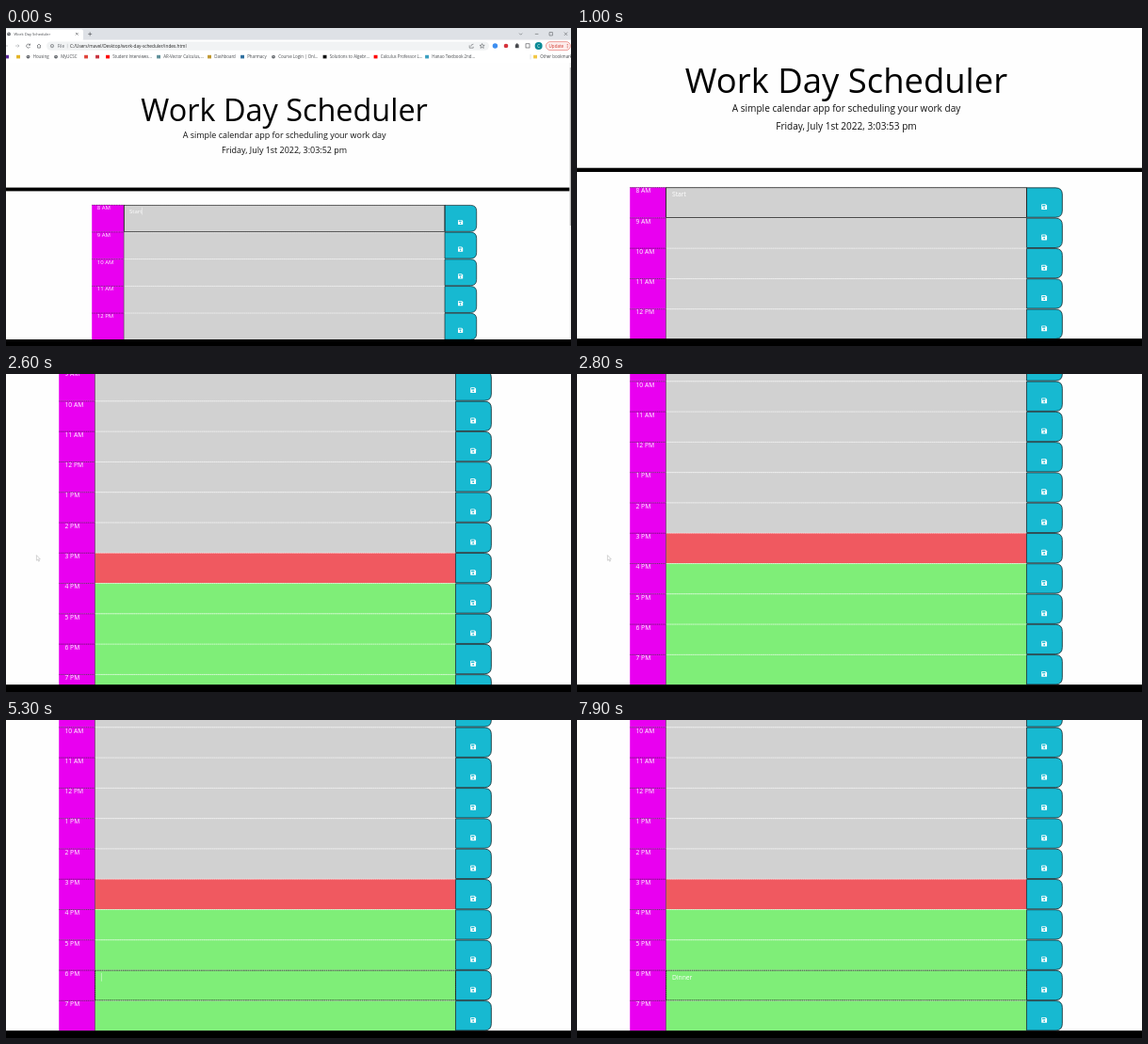
An HTML page that plays this animation: 600x338 px, repeating every 8000 ms.

```html
<!DOCTYPE html>
<html lang="en">
<head>
<meta charset="utf-8">
<title>Work Day Scheduler</title>
<style>
  html, body { margin: 0; width: 100%; height: 100%; overflow: hidden; background: #fefefe; }
  svg { display: block; width: 100vw; height: 100vh; font-family: "Open Sans", "Noto Sans", sans-serif; }
</style>
</head>
<body>
<svg id="stage" viewBox="0 0 600 338"></svg>
<script>
const LOOP = 8000;
const ROW_TOP = 188, ROW_H = 28.72, HOUR_X = 91.2, AREA_X = 125.4, BTN_X = 466, END_X = 500;
const ZOOM = 1.124, ZOOM_X = -46.3, ZOOM_Y = 338 * (1 - ZOOM);
const SCROLL_MAX = 201.4;
const PAST = '#d1d1d1', PRESENT = '#f05960', FUTURE = '#7fee78';

function el(parent, tag, attrs, content) {
  const node = document.createElementNS('http://www.w3.org/2000/svg', tag);
  for (const key in attrs) node.setAttribute(key, attrs[key]);
  if (content !== undefined) node.textContent = content;
  parent.appendChild(node);
  return node;
}
const rect = (p, x, y, width, height, fill, more) => el(p, 'rect', { x, y, width, height, fill, ...more });
const path = (p, d, stroke, width = 0.6, more) =>
  el(p, 'path', { d, stroke, 'stroke-width': width, fill: 'none', ...more });
const text = (p, x, y, size, fill, content, more) =>
  el(p, 'text', { x, y, 'font-size': size, fill, ...more }, content);
const dot = (p, cx, cy, r, fill, more) => el(p, 'circle', { cx, cy, r, fill, ...more });
const show = (node, on) => node.setAttribute('visibility', on ? 'visible' : 'hidden');

const stage = document.getElementById('stage');
rect(stage, 0, 0, 600, 338, '#fefefe');
const view = el(stage, 'g', {});
const page = el(view, 'g', {});

// Header
const middle = { 'text-anchor': 'middle' };
text(page, 295.6, 98.6, 32.4, '#000', 'Work Day Scheduler', middle);
text(page, 295.7, 116.9, 8.96, '#111', 'A simple calendar app for scheduling your work day', middle);
const clock = text(page, 295.6, 133.2, 8.96, '#111', '', middle);
rect(page, -5, 169.6, 604, 3.8, '#000');

// Hour rows
function saveIcon(x, y) {
  const g = el(page, 'g', { transform: `translate(${x} ${y})` });
  el(g, 'path', { d: 'M-2.6-2.1Q-2.6-2.6-2.1-2.6H1.4L2.6-1.4V2.1Q2.6 2.6 2.1 2.6H-2.1Q-2.6 2.6-2.6 2.1Z', fill: '#fff' });
  rect(g, -1.8, -1.9, 2.9, 1.3, '#17b9d1');
  dot(g, 0, 1, 0.8, '#17b9d1');
}

function hourRow(index) {
  const y = ROW_TOP + index * ROW_H, hour = 8 + index, bottom = y + ROW_H;
  const fill = hour < 15 ? PAST : hour === 15 ? PRESENT : FUTURE;
  rect(page, HOUR_X, y, AREA_X - HOUR_X, ROW_H + 0.1, '#e900f0');
  rect(page, AREA_X, y, BTN_X - AREA_X, ROW_H + 0.1, fill);
  path(page, `M${HOUR_X} ${y + 0.2}H${AREA_X}`, '#222', 0.5, { 'stroke-dasharray': '1.1 .5' });
  path(page, `M${AREA_X} ${y + 0.2}H${BTN_X}`, '#fff', 0.8, { opacity: 0.65, 'stroke-dasharray': '1.6 .3' });
  path(page, `M${AREA_X - 0.2} ${y}V${bottom}`, '#333', 0.5);
  text(page, 96.8, y + 5.3, 6, '#fff', `${(hour + 11) % 12 + 1} ${hour < 12 ? 'AM' : 'PM'}`);
  el(page, 'path', {
    d: `M${BTN_X} ${y + 0.4}H${END_X - 6.7}q6.4 0 6.4 6.4V${bottom - 6.8}q0 6.4-6.4 6.4H${BTN_X}Z`,
    fill: '#17b9d1', stroke: '#14262b', 'stroke-width': 0.7
  });
  saveIcon(482.6, y + 18.5);
}
for (let i = 0; i < 12; i++) hourRow(i);

function field(index, dash) {
  const y = ROW_TOP + index * ROW_H;
  const outline = rect(page, AREA_X, y + 0.3, BTN_X - AREA_X, ROW_H - 0.5, 'none',
    { stroke: '#222', 'stroke-width': 0.7, 'stroke-dasharray': dash });
  const label = text(page, 131, y + 8.8, 6, '#fff', '');
  const caret = rect(page, 131, y + 2.6, 0.5, 8, '#fff', { opacity: 0.8 });
  return (value, focused, caretOn) => {
    if (label.textContent !== value) {
      label.textContent = value;
      caret.setAttribute('x', 131 + (value ? label.getComputedTextLength() : 0));
    }
    show(outline, focused);
    show(caret, focused && caretOn);
  };
}
const morning = field(0, 'none'), evening = field(10, '1.6 .4');

// Browser window
const chrome = el(view, 'g', {});
const INK = '#45484c';
function globe(x, y) {
  dot(chrome, x, y, 1.9, '#5f6368');
  path(chrome, `M${x - 1.3} ${y - 0.5}h1.5l.8 1`, '#fff', 0.5);
}
rect(chrome, -5, -5, 660, 18, '#dee1e6');
rect(chrome, -5, 1.6, 87, 12, '#fff', { rx: 2 });
rect(chrome, -5, 12.6, 660, 24.4, '#fff');
globe(3, 6.4);
text(chrome, 8.6, 8, 4.1, INK, 'Work Day Scheduler');
path(chrome, 'M74 5l2.6 2.6m0-2.6L74 7.6M87.2 6.4h4m-2-2v4', INK);
path(chrome, 'M545 5.6l1.6 1.6 1.6-1.6M561.8 6.4h3.6M577 4.6h3.4v3.4h-3.4zM592.8 4.6l3.4 3.4m0-3.4l-3.4 3.4', INK, 0.5);

rect(chrome, 43, 14.4, 470, 9.4, '#f1f3f4', { rx: 4.7 });
path(chrome, 'M-2 19h4M10 19h4m-1.6-1.6l1.6 1.6-1.6 1.6', '#a5a8ac');
path(chrome, 'M25.2 17.8a2 2 0 1 0 .3 2.2M25.6 16.6v1.6h-1.6M33 19l2-1.9 2 1.9M33.6 18.7v2.4h2.8v-2.4', INK);
dot(chrome, 49, 19.1, 1.7, 'none', { stroke: INK, 'stroke-width': 0.5 });
path(chrome, 'M49 18.9v1.2M49 18v.4', INK, 0.5);
text(chrome, 54.8, 20.8, 4.5, '#5f6368', 'File');
path(chrome, 'M65.3 16.8v4.6', '#b5b8bc', 0.5);
text(chrome, 68, 20.8, 4.74, '#222', 'C:/Users/mavel/Desktop/work-day-scheduler/index.html');
path(chrome, 'M492.2 18.4v2.8h4v-1.4M493.8 19.6q0-2.4 2.6-2.4', INK, 0.5);
el(chrome, 'path', { d: 'M505.6 16.6l.7 1.7 1.9.1-1.5 1.2.5 1.8-1.6-1-1.6 1 .5-1.8-1.5-1.2 1.9-.1z', fill: 'none', stroke: INK, 'stroke-width': 0.5 });
dot(chrome, 519.4, 19, 2.7, '#3d8ef0');
dot(chrome, 531, 19, 2.3, '#d6343c');
rect(chrome, 540.8, 17.4, 3.8, 3.8, INK);
dot(chrome, 542.7, 17.2, 0.9, INK);
rect(chrome, 552, 16.8, 4, 4.2, 'none', { stroke: INK, 'stroke-width': 0.6 });
dot(chrome, 565.6, 19.1, 4, '#0b8a96');
text(chrome, 565.6, 20.8, 4.4, '#fff', 'C', middle);
rect(chrome, 573.4, 14.6, 26, 9, '#fdeceb', { rx: 4.5, stroke: '#dd4b40', 'stroke-width': 0.5 });
text(chrome, 576.6, 20.7, 4.5, '#d23b30', 'Update');
for (const y of [17.4, 19.1, 20.8]) dot(chrome, 596.2, y, 0.5, '#d23b30');

// Bookmarks: icon x, label, icon colour (a globe when missing)
const bookmarks = [
  [1, '', '#5b2a9d'], [13, '', '#e4b324'], [23.5, 'Housing'], [53, 'MyUCSC'],
  [85, '', '#e0443a'], [97, '', '#c9333f'], [108, 'Student Interviews...', '#f00'],
  [162, 'AR-Vector Calculus,...', '#5e8f99'], [216, 'Dashboard', '#c0972f'],
  [251, 'Pharmacy', '#2f6f9f'], [284, 'Course Login | Onl...'],
  [338.5, 'Solutions to Algebr...', '#111'], [392.5, 'Calculus Professor L...', '#f00'],
  [447, 'Hanao Textbook 2nd...', '#3a9fc0'], [562, 'Other bookmarks', '#f2c744']
];
for (const [x, label, color] of bookmarks) {
  if (color) rect(chrome, x - 1.9, 28.8, 3.9, 3.6, color);
  else globe(x, 30.6);
  text(chrome, x + 5.2, 32, 4.4, INK, label);
}
path(chrome, 'M557 28v5.4', '#c5c8cc', 0.5);

rect(chrome, 598.4, 37, 5, 295, '#f1f1f1');
const thumb = rect(chrome, 598.8, 42, 4, 168, '#b9b9b9');
rect(view, -10, 331, 680, 20, '#000');

const pointer = el(stage, 'path', {
  d: 'M0 0V5.6L1.3 4.5L2.2 6.6L3.1 6.2L2.2 4.2H3.9Z',
  fill: '#fff', stroke: '#a8a8a8', 'stroke-width': 0.5
});

// Motion
const progress = (t, from, to) => Math.min(1, Math.max(0, (t - from) / (to - from)));
const smooth = u => u * u * (3 - 2 * u);
const cubic = u => u < 0.5 ? 4 * u ** 3 : 1 - 4 * (1 - u) ** 3;
const mix = (a, b, u) => a + (b - a) * u;
const keyTimes = [5900, 6200, 6400, 6600, 6800, 7000];
const FOCUS = 4000, BLUR = 1600;

function draw(t) {
  const zoom = smooth(progress(t, 0, 900));
  view.setAttribute('transform',
    `translate(${ZOOM_X * zoom} ${ZOOM_Y * zoom}) scale(${mix(1, ZOOM, zoom)})`);

  const scroll = cubic(progress(t, 2103, 2800));
  page.setAttribute('transform', `translate(0 ${-SCROLL_MAX * scroll})`);
  thumb.setAttribute('y', 42 + 118 * scroll);

  const second = Math.min(59, 52 + Math.floor((t + 300) / 1000));
  clock.textContent = `Friday, July 1st 2022, 3:03:${second} pm`;

  const typed = keyTimes.filter(k => t >= k).length;
  const blinkStart = typed ? keyTimes[typed - 1] : FOCUS;
  morning('Start', t < BLUR, t < 500);
  evening('Dinner'.slice(0, typed), t >= FOCUS, (t - blinkStart) % 1000 < 500);

  const arrive = smooth(progress(t, 1050, 1550)), leave = smooth(progress(t, 3100, 3900));
  const x = mix(mix(190, 32.4, arrive), 170, leave);
  const y = mix(mix(185, 192.6, arrive), 281, leave);
  pointer.setAttribute('transform', `translate(${x} ${y})`);
  show(pointer, x < 94);
}

function frame(now) {
  draw(now % LOOP);
  requestAnimationFrame(frame);
}
draw(0);
requestAnimationFrame(frame);
</script>
</body>
</html>
```
